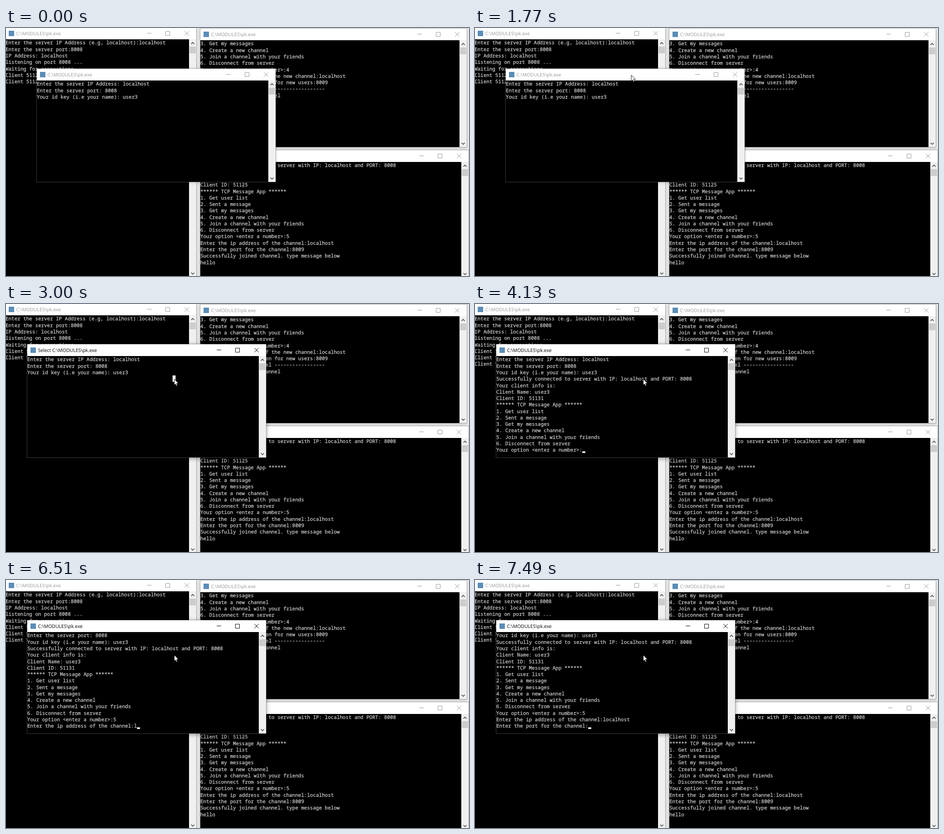
An HTML page for the animation above (8000 ms loop, 1022 px wide and 548 px high).

```html
<!DOCTYPE html>
<html lang="en">
<head>
<meta charset="utf-8">
<title>Chat consoles</title>
<style>
  html, body { margin: 0; width: 100%; height: 100%; overflow: hidden; background: #efefef; }
  svg { display: block; width: 1022px; height: 548px; }
  text { white-space: pre; text-rendering: geometricPrecision; }
  .con { font: 10.91px "Noto Sans Mono", "DejaVu Sans Mono", monospace; fill: #ccc; stroke: #ccc; stroke-width: .28; }
  .title { font: 10.5px "Open Sans", "Noto Sans", sans-serif; fill: #999; }
  .btn { fill: none; stroke: #999; }
  .win { filter: drop-shadow(0 1px 3px rgba(0, 0, 0, .2)); }
  .active .title { fill: #000; }
  .active .btn { stroke: #000; }
  .win.active { filter: drop-shadow(0 2px 5px rgba(0, 0, 0, .4)); }
</style>
</head>
<body>
<svg id="stage" viewBox="0 0 1022 548"></svg>
<script>
const LOOP = 8000, CELL = 6.546, ROW = 14.28, BAR = 26, SCROLL = 16, ROWS = 15;
const PATH = 'C:\\MODULES\\pk.exe';
const stage = document.getElementById('stage');

function add(parent, tag, attrs, text) {
  const el = document.createElementNS('http://www.w3.org/2000/svg', tag);
  for (const key in attrs) el.setAttribute(key, attrs[key]);
  if (text !== undefined) el.textContent = text;
  parent.append(el);
  return el;
}

const rect = (parent, x, y, width, height, fill) =>
  add(parent, 'rect', { x, y, width, height, fill });

const move = (el, [x, y]) => el.setAttribute('transform', `translate(${x} ${y})`);

function chevron(parent, x, y, dir) {
  add(parent, 'path', {
    d: `M${x - 3.4} ${y + 1.8 * dir}L${x} ${y - 1.7 * dir}L${x + 3.4} ${y + 1.8 * dir}`,
    fill: 'none', stroke: '#505050', 'stroke-width': 1.6
  });
}

function makeWindow(x, y, w, h, lines) {
  const g = add(stage, 'g', { class: 'win' });
  move(g, [x, y]);
  rect(g, 0, 0, w, h, '#fff');
  rect(g, 0, BAR, w - SCROLL, h - BAR, '#000');
  rect(g, w - SCROLL, BAR, SCROLL, h - BAR, '#f0f0f0');
  rect(g, w - SCROLL + 1, BAR + 16, SCROLL - 2, 15, '#cdcdcd');
  chevron(g, w - 7.8, BAR + 8.6, 1);
  chevron(g, w - 7.8, h - 7.6, -1);
  add(g, 'rect', {
    x: -.5, y: -.5, width: w + 1, height: h + 1,
    fill: 'none', stroke: '#777', 'stroke-opacity': .5
  });

  rect(g, 7, 7, 12, 12, '#5b8db8');
  const title = add(g, 'text', { class: 'title', x: 23.4, y: 17 }, PATH);
  const [a, b, c] = [w - 104, w - 63, w - 21];
  add(g, 'path', {
    class: 'btn',
    d: `M${a - 5} 12.5H${a + 5}M${b - 4.5} 8.5h9v9h-9zM${c - 4.8} 8.2l9.6 9.6m0 -9.6l-9.6 9.6`
  });

  const rows = lines.map((line, i) =>
    add(g, 'text', { class: 'con', x: 0, y: BAR + 11.4 + i * ROW }, line));
  return { g, title, rows };
}

const menu = [
  '****** TCP Message App ******',
  '1. Get user list',
  '2. Sent a message',
  '3. Get my messages',
  '4. Create a new channel',
  '5. Join a channel with your friends',
  '6. Disconnect from server'
];
const option = 'Your option <enter a number>:';
const askIp = 'Enter the ip address of the channel:';
const askPort = 'Enter the port for the channel:';
const joined = (name, id) => [
  'Successfully connected to server with IP: localhost and PORT: 8008',
  'Your client info is:',
  'Client Name: ' + name,
  'Client ID: ' + id
];

const server = makeWindow(-1, -1, 421, 551, [
  'Enter the server IP Address (e.g, localhost):localhost',
  'Enter the server port:8008',
  'IP Address: localhost',
  'listening on port 8008 ...',
  'Waiting for connections',
  'Client 51124 connected',
  'Client 51125 connected',
  'Client 51131 connected'
]);
const newClient = server.rows[7];

makeWindow(429, 1, 588, 262, [
  ...menu.slice(3),
  option + '4',
  'Enter the ip address of the new channel:localhost',
  'Enter the port to listen for new users:8009',
  '-'.repeat(16) + ' Channel ' + '-'.repeat(17),
  'Successfully joined channel'
]);

makeWindow(429, 270, 592, 281, [
  ...joined('user2', 51125),
  ...menu,
  option + '5',
  askIp + 'localhost',
  askPort + '8009',
  'Successfully joined channel. type message below',
  'hello'
]);

const front = makeWindow(68, 90, 527, 250, Array(ROWS).fill(''));
const caret = rect(front.g, 0, 0, CELL, 3.6, '#fff');
const block = rect(front.g, 49 * CELL, BAR + 3 * ROW, CELL, ROW, '#fff');
const pointer = add(stage, 'path', {
  d: 'M.5 .5V14L3.4 11.2L5.4 15.8L7.6 14.9L5.6 10.3H9.8Z',
  fill: '#fff', stroke: '#000', 'stroke-width': .9
});

const log = [
  'Enter the server IP Address: localhost',
  'Enter the server port: 8008',
  'Your id key (i.e your name): user3',
  ...joined('user3', 51131),
  ...menu
];

// Each step changes only the listed parts of the state.
const steps = [
  [0, { win: [68, 90], shown: 3, input: [], caret: false, active: false, select: false, mouse: null }],
  [360, { mouse: [664, 365] }],
  [730, { mouse: [501, 254] }],
  [860, { mouse: [339, 144] }],
  [1120, { mouse: [330, 126] }],
  [1230, { mouse: [334, 121] }],
  [1380, { mouse: [340, 112] }],
  [1500, { mouse: [345, 107] }],
  [1640, { mouse: [344.5, 103.5] }],
  [1890, { mouse: [337, 103], win: [61, 90], active: true }],
  [1980, { mouse: [321.5, 101.3], win: [47, 89] }],
  [2130, { mouse: [347, 133] }],
  [2270, { mouse: [371, 165.3] }],
  [2390, { select: true }],
  [3120, { select: false }],
  [3490, { caret: true }],
  [4020, { shown: 5, caret: false }],
  [4130, { shown: log.length, input: [option], caret: true }],
  [4990, { caret: false }],
  [5490, { caret: true }],
  [5610, { input: [option + '5'] }],
  [5860, { input: [option + '5', askIp] }],
  ...[[6510, 1], [6620, 2], [6870, 3], [6990, 4], [7110, 6], [7230, 7], [7370, 9]].map(([t, n]) =>
    [t, { input: [option + '5', askIp + 'localhost'.slice(0, n)] }]),
  [7490, { input: [option + '5', askIp + 'localhost', askPort] }]
];

const states = [];
steps.reduce((prev, [, change]) => {
  const next = { ...prev, ...change };
  states.push(next);
  return next;
}, {});

const show = (el, on) => el.setAttribute('visibility', on ? 'visible' : 'hidden');

function draw(s) {
  const lines = [...log.slice(0, s.shown), ...s.input].slice(-ROWS);
  front.rows.forEach((row, i) => { row.textContent = lines[i] || ''; });
  move(front.g, s.win);
  front.g.classList.toggle('active', s.active);
  front.title.textContent = (s.select ? 'Select ' : '') + PATH;
  caret.setAttribute('x', lines[lines.length - 1].length * CELL);
  caret.setAttribute('y', BAR + lines.length * ROW - 3.6);
  show(caret, s.caret);
  show(block, s.select);
  show(newClient, s.shown > 3);
  show(pointer, s.mouse);
  if (s.mouse) move(pointer, s.mouse);
}

let current = -1;
function tick() {
  const t = performance.now() % LOOP;
  let i = steps.length - 1;
  while (steps[i][0] > t) i--;
  if (i !== current) draw(states[current = i]);
  requestAnimationFrame(tick);
}
tick();
</script>
</body>
</html>
```
